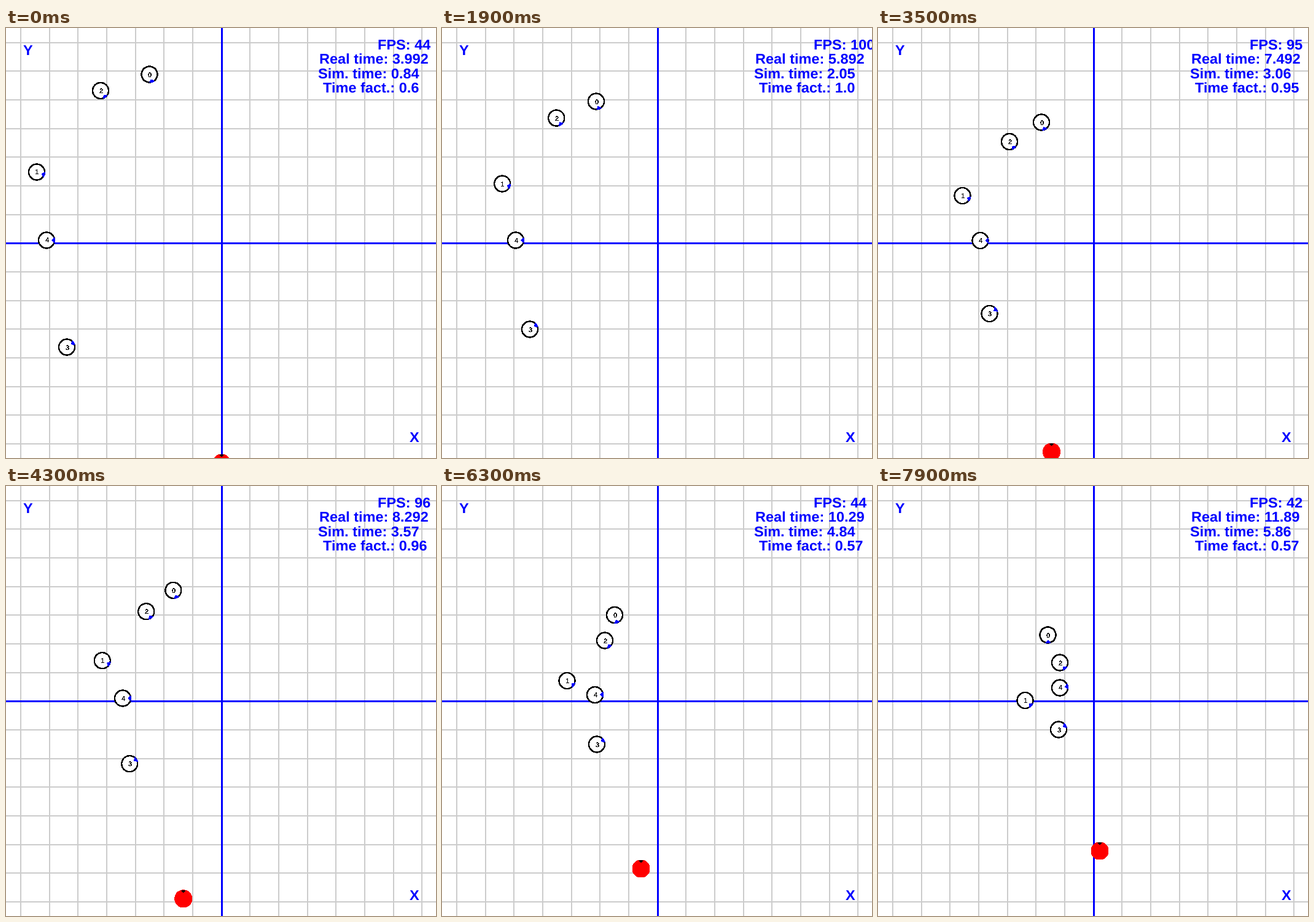
Recreate the animation shown at these times as a matplotlib script. Size 700x700 px, loop 8000 ms.

```python
import math
import random

import matplotlib.pyplot as plt
import numpy as np
from matplotlib.animation import FuncAnimation
from matplotlib.patches import Circle, Polygon, Rectangle

plt.rcParams["text.hinting"] = "none"

SIZE, FRAMES, STEP = 700, 80, 100
PX = 0.72  # points per pixel at 100 dpi
BLUE = "#0000ff"
CELL = 140 / 3
HEADING_LAG = 1.5  # seconds by which a robot's nose trails its course


class Path:
    """Cubic curve through four points, passed at KEYS seconds."""
    KEYS = (0, 3.5, 6.3, 7.9)

    def __init__(self, *points):
        self.x, self.y = (np.polyfit(self.KEYS, c, 3) for c in zip(*points))

    def at(self, t):
        return np.polyval(self.x, t), np.polyval(self.y, t)

    def heading(self, t):
        dx, dy = (np.polyval(np.polyder(c), t) for c in (self.x, self.y))
        return math.atan2(dy, dx)


ROBOTS = [
    Path((233.5, 75.5), (266, 153.5), (281, 210), (276.5, 242.5)),
    Path((50, 234.5), (137.5, 273), (203.5, 317), (239.5, 349)),
    Path((154, 102), (214, 185), (265, 251.5), (296, 287.5)),
    Path((99, 519.5), (181.5, 465), (252, 420.5), (294, 396.5)),
    Path((66, 345.5), (166.5, 346), (249, 340), (296, 328.5)),
]
TARGET = Path((351, 708), (282.5, 690), (324, 623), (361, 594))


def reading(i):
    """Frame rate and time factor: mostly slow, with a regular fast spike."""
    if i % 8 == 3:
        fps = min(100, round(94 + 0.3 * abs(i - 38)))
        return fps, fps / 100
    rng = random.Random(i)
    return rng.randint(41, 45), round(rng.uniform(0.53, 0.62), 2)


def notch(x, y, angle, r):
    """Small triangle with its base on the rim, pointing inward."""
    rim = [(r, -0.3), (r, 0), (r, 0.3), (r - 4.5, 0)]
    return [(x + d * math.cos(angle + a), y + d * math.sin(angle + a))
            for d, a in rim]


def bar(x, y, w, h, color):
    ax.add_patch(Rectangle((x, y), w, h, fc=color, lw=0, aa=False))


def label(x, y, s="", size=23.5, **kw):
    return ax.text(x, y, s, fontsize=size * PX, family="Liberation Sans",
                   weight="bold", va="baseline", **kw)


fig = plt.figure(figsize=(7, 7), dpi=100, facecolor="white")
ax = fig.add_axes([0, 0, 1, 1])
ax.set_xlim(0, SIZE)
ax.set_ylim(SIZE, 0)
ax.axis("off")

for k in range(-7, 8):
    bar(round(350.67 + CELL * k) - 1, 0, 2, SIZE, "#cccccc")
    bar(0, round(350.33 + CELL * k) - 1, SIZE, 2, "#cccccc")
bar(350, 0, 3, SIZE, BLUE)
bar(0, 349, SIZE, 3, BLUE)

label(27.8, 44.5, "Y", color=BLUE)
label(656.8, 674.5, "X", color=BLUE)
lines = [label(x, 35 + 23.2 * n, color=BLUE)
         for n, x in enumerate((605, 510.5, 508.3, 516.5))]

target = ax.add_patch(Circle((0, 0), 14, fc="red", lw=0, aa=False, zorder=2))
target_notch = ax.add_patch(Polygon([(0, 0)] * 4, fc="black", lw=0, zorder=3))
bodies, notches, digits = [], [], []
for n in range(len(ROBOTS)):
    z = 4 + n
    bodies.append(ax.add_patch(Circle((0, 0), 13, fc="white", ec="black",
                                      lw=1.25 * PX, aa=False, zorder=z)))
    notches.append(ax.add_patch(Polygon([(0, 0)] * 4, fc=BLUE, lw=0,
                                        aa=False, zorder=z + 0.1)))
    digits.append(label(0, 0, str(n), 11, color="black", ha="center",
                        antialiased=False, zorder=z + 0.2))


def draw(i):
    t = i * STEP / 1000
    fps, factor = reading(i)
    stats = (f"FPS: {fps}",
             f"Real time: {f'{3.992 + t:.3f}'[:5]}",
             f"Sim. time: {round(0.84 + 0.635 * t, 2)}",
             f"Time fact.: {factor}")
    for line, text in zip(lines, stats):
        line.set_text(text)

    target.center = TARGET.at(t)
    target_notch.set_xy(notch(*target.center, -math.pi / 2, 14))
    for path, body, mark, digit in zip(ROBOTS, bodies, notches, digits):
        x, y = body.center = path.at(t)
        mark.set_xy(notch(x, y, path.heading(max(t - HEADING_LAG, 0)), 13.5))
        digit.set_position((x + 0.5, y + 4))
    return []


anim = FuncAnimation(fig, draw, frames=FRAMES, init_func=lambda: draw(0),
                     interval=STEP, repeat=True, repeat_delay=0, blit=False)
plt.show()
```
